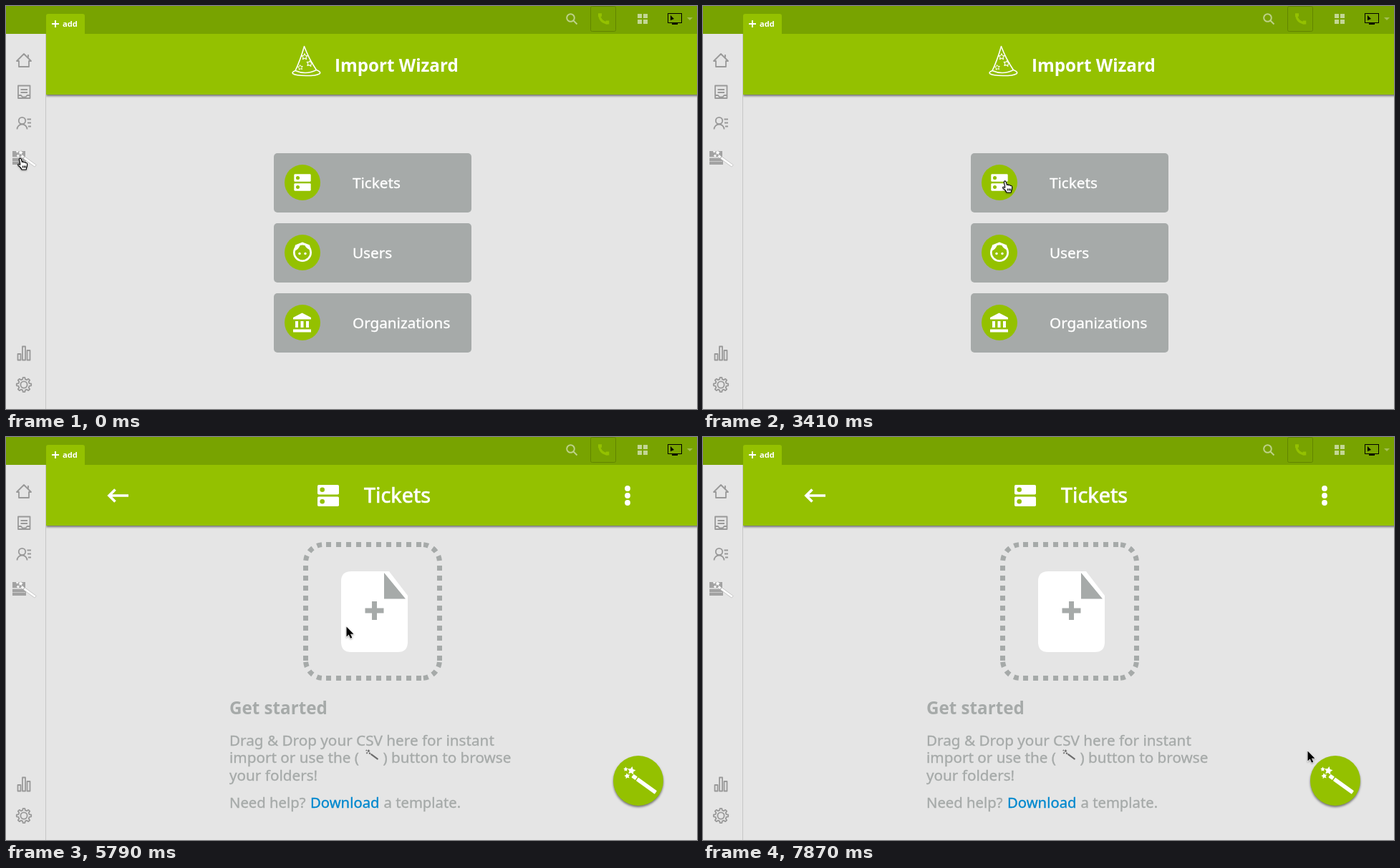
Write an HTML page that moves like this. It is 965x564 px and loops after 8000 ms.

```html
<!DOCTYPE html>
<html lang="en">
<head>
<meta charset="utf-8">
<title>Import Wizard</title>
<style>
  html, body { margin: 0; width: 100%; height: 100%; overflow: hidden; background: #e5e5e5; }
  svg { display: block; color: #a6aaa9; }
  text { font: 20.7px "Noto Sans", "Open Sans", sans-serif; fill: currentColor; stroke: currentColor; stroke-width: .35px; }
  .title { font: bold 24.2px "Open Sans", "Noto Sans", sans-serif; stroke: none; }
  .large { font-size: 28.8px; stroke-width: .7px; }
  .small { font-size: 11.2px; font-weight: 600; stroke: none; }
  .note { font-size: 20.3px; }
  .link { color: #0088ce; }
  .white { color: #fff; fill: #fff; }
  .green { fill: #94c100; }
  .grey { fill: #a6aaa9; }
  .line { fill: none; stroke: #999; stroke-width: 1.8; stroke-linejoin: round; }
  .line.white { stroke: #fff; stroke-width: 1.6; }
  .dash { fill: none; stroke: #a6aaa9; stroke-width: 7; }
  .shadow { filter: drop-shadow(0 2px 1.8px rgba(0, 0, 0, .5)); }
  .cursor { filter: drop-shadow(0 1px 1px rgba(0, 0, 0, .35)); }

  /* the page opens at 4610 ms, its icons follow at 4750 ms */
  #menu { animation: leave 8s step-end infinite; }
  #upload { animation: open 8s step-end infinite; }
  #icons { animation: load 8s step-end infinite; }
  @keyframes leave { 0% { visibility: visible } 57.625%, 100% { visibility: hidden } }
  @keyframes open { 0% { visibility: hidden } 57.625%, 100% { visibility: visible } }
  @keyframes load { 0% { visibility: hidden } 59.375%, 100% { visibility: visible } }
</style>
</head>
<body>
<svg width="965" height="564" viewBox="0 0 965 564">
  <defs>
    <path id="star"/>
    <g id="rack">
      <rect x="-15" y="-15" width="30" height="13.500" rx="1.700"/>
      <rect x="-15" y="1.500" width="30" height="13.500" rx="1.700"/>
      <circle class="green" cx="-8.300" cy="-8.300" r="3.300"/>
      <circle class="green" cx="-8.300" cy="8.300" r="3.300"/>
    </g>
    <g id="wand">
      <use href="#star" transform="translate(11.500 6) rotate(10) scale(.6)"/>
      <use href="#star" transform="translate(3.500 4) scale(.34)"/>
      <use href="#star" transform="translate(5.500 13.500) rotate(-10) scale(.42)"/>
      <g transform="translate(13 13) rotate(36)">
        <rect y="-2.800" width="6.500" height="5.600" rx=".8"/>
        <rect x="8" y="-2.800" width="32" height="5.600" rx=".8"/>
      </g>
    </g>
    <g id="card">
      <rect class="grey" x="374" y="206" width="276" height="83" rx="5"/>
      <circle class="green" cx="414" cy="247" r="25"/>
    </g>
  </defs>

  <rect width="965" height="564" fill="#e5e5e5"/>
  <rect class="green shadow" x="56" y="39" width="920" height="85"/>

  <!-- sidebar -->
  <rect y="39" width="55" height="525" fill="#e5e5e5"/>
  <rect x="55" y="39" width="1" height="525" fill="#c6c6c6"/>
  <g class="line">
    <path d="M15 77l10-10 10 10h-3v8H18v-8zM31 73v-5"/>
    <path d="M17 111.500h16.500v17.500H17zM20.500 117h9.500M20.500 121h9.500M17 125h4l2 2.500h4.500l2-2.500h4"/>
    <circle cx="22.500" cy="160.500" r="4.700"/>
    <path d="M15.500 172.500a7 7 0 0 1 14 0M29.500 158.500h5.500M30 163.500h5M31 168.500h4"/>
    <path d="M16.500 487h4v8.500h-4zM23 476.500h4v19h-4zM29.500 482h4v13.500h-4z"/>
    <path id="gear"/>
    <circle cx="25" cy="530" r="4.600"/>
  </g>
  <path d="M9 203h18v8H9zM9 213h19v9H9z" fill="#a2a2a2"/>
  <path d="M9 212h18M9 217.500h18" stroke="#c9c9c9"/>
  <use href="#wand" class="white" transform="translate(13.500 201.500) scale(.61)" stroke="#b2b2b2" stroke-width="1"/>

  <!-- top bar -->
  <rect width="965" height="39" fill="#78a300"/>
  <path class="green" d="M56 39V14q0-3 3-3h48q3 0 3 3v25z"/>
  <path d="M64 25h10M69 20v10" stroke="#fff" stroke-width="2"/>
  <text class="white small" x="79" y="29">add</text>
  <g fill="none" stroke="#bdd188" stroke-width="2">
    <circle cx="788.500" cy="16.500" r="5.300"/>
    <path d="M792.500 20.500l5 5"/>
  </g>
  <rect x="816.500" y=".5" width="35" height="35" rx="2" fill="none" stroke="#628500"/>
  <g fill="none" stroke="#94c100">
    <path d="M828.500 12q1 11 12 12" stroke-width="3"/>
    <path d="M827 12.500h5M840 20.500v5" stroke-width="4.500"/>
  </g>
  <path d="M882 11h6v6h-6zM890 11h6v6h-6zM882 19h6v6h-6zM890 19h6v6h-6z" fill="#c3d694"/>
  <rect x="924.500" y="10.500" width="19" height="13" fill="none" stroke="#000"/>
  <path d="M930 24h8v2h-8zM928 13v7l5-2z"/>
  <path d="M951 16h8l-4 4z" fill="#a3bf55"/>

  <!-- choice of import -->
  <g id="menu" class="white">
    <g class="line white">
      <path d="M404 90.500Q411 76 416.500 56.500Q423 74 433.500 89.500Q419 97 404 90.500C397 93 398 97.500 419 97.500S443 93 433.500 89.500"/>
      <g stroke-width="2.600">
        <use href="#star" transform="translate(417 71) scale(.43)"/>
        <use href="#star" transform="translate(424 80.500) rotate(12) scale(.43)"/>
        <use href="#star" transform="translate(411 86) rotate(-8) scale(.36)"/>
      </g>
    </g>
    <text class="title" x="459" y="92">Import Wizard</text>
    <use href="#card"/>
    <use href="#card" y="98"/>
    <use href="#card" y="196"/>
    <use href="#rack" transform="translate(414 247) scale(.78)"/>
    <circle class="line white" cx="414" cy="345" r="11.700" style="stroke-width:2.600px"/>
    <path d="M402 343q7-2 9-9h6q2 6 9 7.500l-2-7-10-4-10 4z"/>
    <circle cx="410" cy="346.500" r="1.700"/>
    <circle cx="418" cy="346.500" r="1.700"/>
    <path d="M401 436l12.500-6.500 12.500 6.500v2.500h-25zM401 452.500h25v4h-25zM404 441h4v9h-4zM411.500 441h4v9h-4zM419 441h4v9h-4z"/>
    <text x="484" y="255">Tickets</text>
    <text x="484" y="353">Users</text>
    <text x="484" y="451">Organizations</text>
  </g>

  <!-- ticket upload -->
  <g id="upload">
    <use href="#rack" class="white" transform="translate(450 82)"/>
    <text class="white large" x="500" y="92">Tickets</text>
    <path class="dash" stroke-dasharray="7" d="M447 150.500h133M447 337.500h133M418.500 180v133M605.500 180v133"/>
    <path class="dash" stroke-dasharray="6.750" stroke-dashoffset="-2.750" d="M418.500 175.500a25 25 0 0 1 25-25M580.500 150.500a25 25 0 0 1 25 25M605.500 312.500a25 25 0 0 1-25 25M443.500 337.500a25 25 0 0 1-25-25"/>
    <text class="title" x="312" y="388">Get started</text>
    <text x="312" y="431.500">Drag &amp; Drop your CSV here for instant</text>
    <text x="312" y="456">import or use the (</text>
    <text x="526.500" y="456">) button to browse</text>
    <text x="312" y="480.500">your folders!</text>
    <text class="note" x="312" y="519">Need help?</text>
    <text class="note link" x="425" y="519">Download</text>
    <text class="note" x="527.500" y="519">a template.</text>
    <circle class="green shadow" cx="883" cy="481" r="35"/>
  </g>
  <g id="icons" class="white">
    <path d="M171 82h-27M152.500 73.500L144 82l8.500 8.500" fill="none" stroke="#fff" stroke-width="3.700"/>
    <circle cx="868" cy="72" r="3.900"/>
    <circle cx="868" cy="82" r="3.900"/>
    <circle cx="868" cy="92" r="3.900"/>
    <path d="M482 188h53l26 34v65q0 14-14 14h-65q-14 0-14-14v-85q0-14 14-14z"/>
    <path class="grey" d="M528 190v36.500h30zM501.500 239.500h26v7h-26zM511 230h7v26h-7z"/>
    <use href="#wand" transform="translate(862 461)"/>
    <use href="#wand" transform="translate(502 437) scale(.385)" fill="#6c6c6c"/>
  </g>

  <g id="cursor" class="cursor">
    <path id="arrow" d="M.5 .5v14l3.200-3 2.300 5.200 2.300-1-2.300-5h4.500z" stroke="#fff" stroke-width="1.200" paint-order="stroke"/>
    <path id="hand" d="M1 9.500L-.6 2.600Q0-.5 2 2l1.500 4.500q1.500-1.500 2.500 .4 1.500-1 2.300 .7 2-.6 2.300 1.400 .2 3.500-1 5.500l-.3 2.500H3q-1-3-5-6-1-2.500 1.800-1.500L1 11M4.500 11.500v3M6.500 11.500v3M8.300 11.500v3" fill="#fff" stroke="#000" stroke-width="1.100" stroke-linejoin="round"/>
  </g>
</svg>
<script>
  const LOOP = 8000, OPEN = 4610, STEP = 145;
  const $ = id => document.getElementById(id);
  const smooth = u => u * u * (3 - 2 * u);
  const lateStart = u => smooth(u ** 1.9);
  const linear = u => u;
  const easeIn = u => u ** 1.9;
  const easeOut = u => 1 - (1 - u) ** 2;

  // each leg leads from the end of the one before, in even steps of time
  const legs = [
    { at: 0, steps: 1, x: 19, y: 212 },
    { at: 1050, steps: 8, x: 418, y: 237, easeX: lateStart, easeY: smooth },
    { at: 2220, steps: 1, x: 418, y: 241 },
    { at: 2970, steps: 4, x: 421, y: 244 },
    { at: OPEN, steps: 1, x: 421, y: 243 },
    { at: 5500, steps: 3, x: 475, y: 265, easeX: easeIn, easeY: easeIn },
    { at: 6090, steps: 3, x: 553, y: 312 },
    { at: 6690, steps: 1, x: 651, y: 330 },
    { at: 6840, steps: 1, x: 734, y: 377 },
    { at: 7140, steps: 6, x: 844, y: 439, easeX: easeOut, easeY: easeOut }
  ];

  function pointer(t) {
    const i = legs.findLastIndex(leg => leg.at <= t);
    const { at, steps, x, y, easeX = linear, easeY = linear } = legs[i];
    const from = legs[Math.max(i - 1, 0)];
    const u = Math.min(1, (Math.floor((t - at) / STEP) + 1) / steps);
    return [
      Math.round(from.x + (x - from.x) * easeX(u)),
      Math.round(from.y + (y - from.y) * easeY(u))
    ];
  }

  // closed outline: the [turn, radius] profile repeated n times round a centre
  function wheel(cx, cy, n, profile) {
    const pts = [];
    for (let i = 0; i < n; i++)
      for (const [turn, r] of profile) {
        const a = (i + turn) / n * 2 * Math.PI;
        pts.push((cx + r * Math.sin(a)).toFixed(2) + " " + (cy - r * Math.cos(a)).toFixed(2));
      }
    return "M" + pts.join("L") + "Z";
  }
  $("star").setAttribute("d", wheel(0, 0, 5, [[0, 10], [.5, 5]]));
  $("gear").setAttribute("d", wheel(25, 530, 8, [[-.3, 7.8], [-.17, 10.3], [.17, 10.3], [.3, 7.8]]));

  const clock = document.timeline;
  const anims = document.getAnimations();
  const start = performance.now();
  anims.forEach(a => { a.startTime = clock.currentTime === null ? 0 : start; });

  function tick() {
    const t = (performance.now() - start) % LOOP;
    const [x, y] = pointer(t);
    const hand = t < OPEN && (x < 42 || x >= 374);
    $("hand").style.visibility = hand ? "visible" : "hidden";
    $("arrow").style.visibility = hand ? "hidden" : "visible";
    $("cursor").setAttribute("transform", `translate(${x} ${y})`);
    requestAnimationFrame(tick);
  }
  tick();
</script>
</body>
</html>
```
